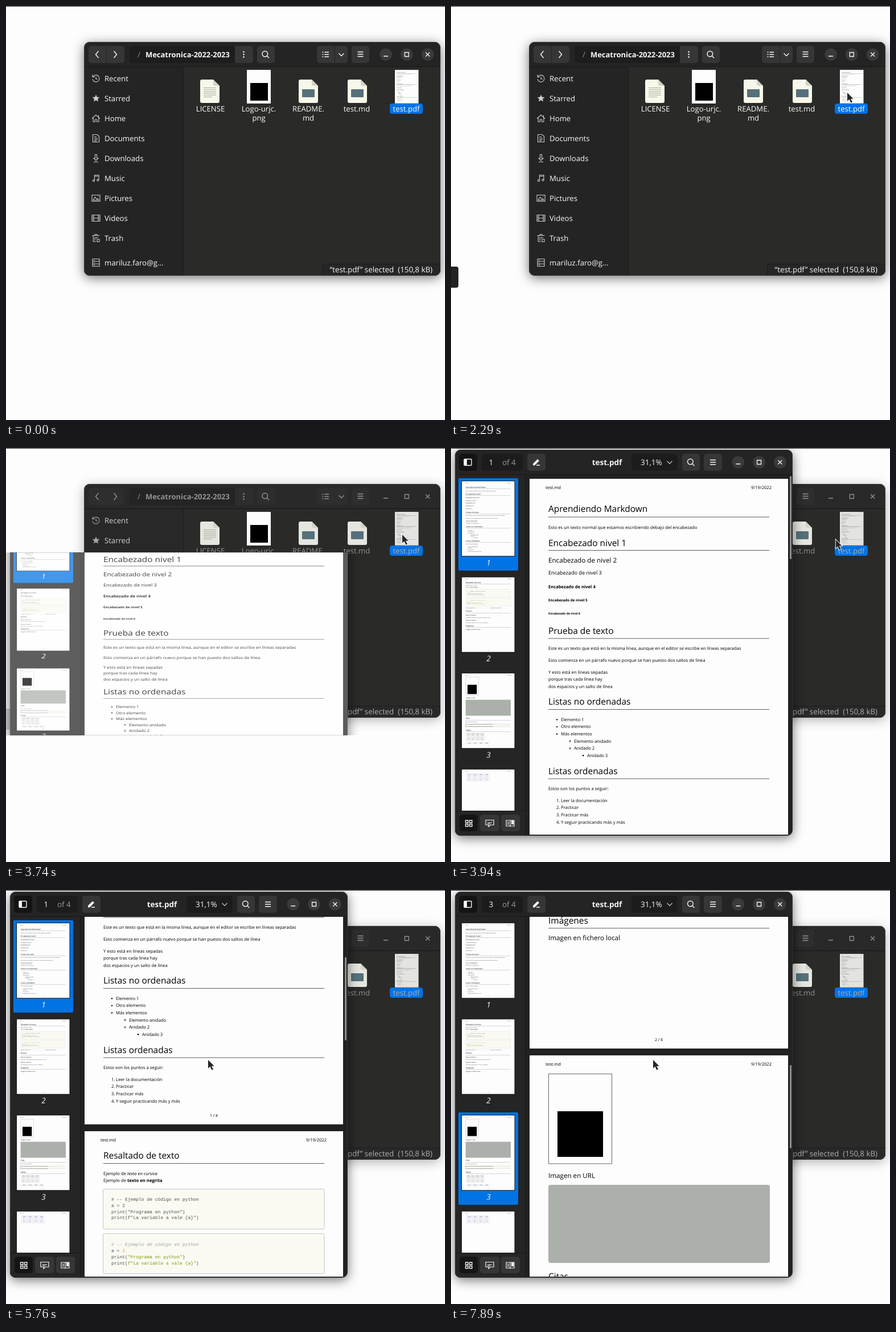
An HTML page with a canvas that plays this animation: 771x726 px, repeating every 8 s.

```html
<!DOCTYPE html>
<html lang="es">
<head>
<meta charset="utf-8">
<title>Vista previa de PDF</title>
<style>
html, body { margin: 0; width: 100%; height: 100%; overflow: hidden; background: #fdfdfd; }
canvas { display: block; }
</style>
</head>
<body>
<canvas id="stage" width="771" height="726"></canvas>
<script>
const ctx = document.getElementById('stage').getContext('2d');
const LOOP = 8000, BLUE = '#0073e5', SANS = '"Open Sans", "Noto Sans", sans-serif';
const MONO = '"Liberation Mono", "DejaVu Sans Mono", monospace';
const NOTCHES = [5360, 5560, 5660, 5760, 5870, 5930, 6440, 6570, 6740, 6910, 7180, 7350, 7450, 7550, 7890];
const NOTCH = 71.6, PITCH = 655, PAGE_W = 454, PAGE_H = 643;

const clamp = v => Math.max(0, Math.min(1, v));
const smooth = v => { v = clamp(v); return v * v * (3 - 2 * v); };
const mix = (a, b, k) => a + (b - a) * k;
const gray = v => `rgb(${v},${v},${v})`;

// y is the middle of the capital letters
function text(s, x, y, size, color = '#000', style = '', align = 'left', family = SANS) {
  ctx.font = `${style} ${size}px ${family}`;
  ctx.fillStyle = color;
  ctx.textAlign = align;
  ctx.fillText(s, x, y + size * 0.36);
  return ctx.measureText(s).width;
}
function box(x, y, w, h, color, r = 0) {
  ctx.fillStyle = color;
  ctx.beginPath();
  ctx.roundRect(x, y, w, h, r);
  ctx.fill();
}
function frame(x, y, w, h, color, r = 0, width = 1) {
  ctx.strokeStyle = color;
  ctx.lineWidth = width;
  ctx.beginPath();
  ctx.roundRect(x, y, w, h, r);
  ctx.stroke();
}
function dot(x, y, r, color) {
  ctx.fillStyle = color;
  ctx.beginPath();
  ctx.arc(x, y, r, 0, 7);
  ctx.fill();
}
function icon(d, x, y, color, fill = false, width = 1.1) {
  ctx.save();
  ctx.translate(x, y);
  const path = new Path2D(d);
  ctx.fillStyle = ctx.strokeStyle = color;
  ctx.lineWidth = width;
  fill ? ctx.fill(path) : ctx.stroke(path);
  ctx.restore();
}
function openWindow(x, y, w, h, color, shade) {
  ctx.save();
  ctx.shadowColor = `rgba(0,0,0,${shade})`;
  ctx.shadowBlur = 20;
  ctx.shadowOffsetY = 4;
  box(x, y, w, h, color, 10);
  ctx.restore();
  ctx.save();
  ctx.beginPath();
  ctx.roundRect(x, y, w, h, 10);
  ctx.clip();
}
function closeWindow(x, y, w, h) {
  ctx.restore();
  frame(x + .5, y + .5, w - 1, h - 1, 'rgba(90,90,90,.35)', 10);
}

const SEARCH = 'M-6 -1a4.8 4.8 0 1 0 9.6 0a4.8 4.8 0 1 0 -9.6 0M2.2 2.6L6 6.2';
const MENU = 'M-5 -4H5M-5 0H5M-5 4H5';
const DOWN = 'M-4.5 -2L0 2.5L4.5 -2';
const CONTROLS = ['M-4 3H4', 'M-3.5 -3.5H3.5V3.5H-3.5z', 'M-3.5 -3.5L3.5 3.5M3.5 -3.5L-3.5 3.5'];
function controls(x, y, disc, ink) {
  CONTROLS.forEach((d, i) => {
    dot(x + i * 36.8, y, 10.8, disc);
    icon(d, x + i * 36.8, y, ink, false, 1.3);
  });
}

/* ---------- document ---------- */

const h1 = (s, y, rule) => {
  text(s, 33, y, 15.45);
  box(33, rule - .5, 388, 1, '#5c5c68');
};
const h2 = (s, y) => text(s, 33, y, 11.65);
const para = (s, y, x = 33) => text(s, x, y, 7.7);
function runs(x, y, parts) {
  for (const [s, color, style, mono] of parts)
    x += text(s, x, y, mono ? 8 : 7.7, color, style, 'left', mono ? MONO : SANS);
}
const code = (y, ...parts) => runs(47, y, parts.map(([s, c, st]) => [s, c, st, true]));

function table(y, cols, rows, step, color) {
  for (let r = 0; r < rows; r++) {
    for (let c = 0; c < cols; c++) {
      frame(39 + c * step, y + r * 17, step, 17, '#c4c4d0');
      text(r ? 'dato ' + (r + c) : 'Campo', 39 + (c + .5) * step, y + r * 17 + 8.5, 7.7, color, r ? '' : 'bold', 'center');
    }
  }
}

const PAGES = [
  () => {
    h1('Aprendiendo Markdown', 52, 67);
    para('Esto es un texto normal que estamos escribiendo debajo del encabezado', 85);
    h1('Encabezado nivel 1', 112, 125.5);
    h2('Encabezado de nivel 2', 143);
    text('Encabezado de nivel 3', 33, 165, 9.1);
    [[189, 7.6], [212.5, 6.3], [236.5, 5.15]].forEach(([y, size], i) =>
      text('Encabezado de nivel ' + (i + 4), 33, y, size, '#000', 'bold'));
    h1('Prueba de texto', 266, 280);
    para('Este es un texto que está en la misma línea, aunque en el editor se escribe en líneas separadas', 297.5);
    para('Esto comienza en un párrafo nuevo porque se han puesto dos saltos de línea', 318);
    para('Y esto está en líneas sepadas', 339);
    para('porque tras cada línea hay', 351.3);
    para('dos espacios y un salto de línea', 364);
    h1('Listas no ordenadas', 390, 404.5);
    ['Elemento 1', 'Otro elemento', 'Más elementos', 'Elemento anidado', 'Anidado 2', 'Anidado 3'].forEach((s, i) => {
      const y = 422 + i * 12.6, level = i < 3 ? 0 : i < 5 ? 1 : 2;
      const x = 55 + level * 23;
      para(s, y, x);
      if (level === 0) dot(x - 7, y + .3, 1.2, '#111');
      if (level === 1) frame(x - 8.2, y - 1, 2.5, 2.5, '#111', 1.2, .8);
      if (level === 2) box(x - 8, y - .9, 2.3, 2.3, '#111');
    });
    h1('Listas ordenadas', 512, 526);
    para('Estos son los puntos a seguir:', 543);
    ['Leer la documentación', 'Practicar', 'Practicar más', 'Y seguir practicando más y más'].forEach((s, i) => {
      para(i + 1 + '.', 564 + i * 12.65, 47);
      para(s, 564 + i * 12.65, 55);
    });
  },
  () => {
    h1('Resaltado de texto', 42.5, 56.5);
    runs(33, 74, [['Ejemplo de '], ['texto en cursiva', '#000', 'italic']]);
    runs(33, 86, [['Ejemplo de '], ['texto en negrita', '#000', 'bold']]);
    for (const y of [101.5, 179.5]) {
      box(32.5, y, 388.5, 70, '#fafaf3', 2);
      frame(32.5, y, 388.5, 70, '#c3c5c9', 2);
    }
    const note = '# -- Ejemplo de código en python', ink = '#505050', str = '#7f9900';
    const hello = '"Programa en python"', value = '"La variable a vale {a}"';
    code(119, [note, ink]);
    code(130, ['a = 2', ink]);
    code(140.7, [`print(${hello})`, ink]);
    code(151.5, [`print(f${value})`, ink]);
    code(198.5, [note, '#a0a0a0', 'italic']);
    code(209.2, ['a = ', ink], ['2', '#e0942c']);
    code(220, ['print(', ink], [hello, str], [')', ink]);
    code(231, ['print(', ink], ['f' + value, str], [')', ink]);
    runs(33, 264.5, [['En python la expresión '], ['print(f" a + b = {2 + 1} ")', '#c2b98c', '', true],
      [' produce como resultado '], ['a + b = 2', '#c2b98c', '', true]]);
    h1('Enlaces', 292, 306);
    h2('Enlaces externos', 324);
    runs(33, 345.5, [['En docuteria encontramos más información sobre '], ['markdown', '#1c1cc0']]);
    h2('Enlaces internos', 369);
    runs(33, 390.5, [['Aquí hay información sobre '], ['los enlaces', '#1c1cc0'], [' en markdwon']]);
    h1('Imágenes', 418, 432);
    h2('Imagen en fichero local', 449);
  },
  () => {
    frame(33.5, 32.5, 111, 157.5, '#666');
    box(49, 98, 80, 80, '#000');
    h2('Imagen en URL', 211);
    box(33, 227, 389, 137, '#abb1aa', 4);
    h1('Citas', 387, 402);
    para('Esto es una cita de prueba:', 418);
    for (const y of [432, 450]) {
      box(33, y, 388, 14, '#f1f1ea');
      box(33, y, 4, 14, '#8a8a9a');
      para('Una cita breve que se escribe en una sola línea del documento', y + 7, 45);
    }
    h1('Tablas', 487, 502);
    table(512, 4, 4, 39, '#333');
    table(592, 4, 1, 50, '#333');
  },
  () => table(34, 4, 4, 50, '#3c2c90')
];

function page(i) {
  box(0, 0, PAGE_W, PAGE_H, '#fdfdfd');
  text('test.md', 28, 15, 7.6);
  text('9/19/2022', 425, 15, 7.6, '#000', '', 'right');
  PAGES[i]();
  text(i + 1 + ' / 4', 227, 627, 7, '#000', '', 'center');
}
function pageAt(i, x, y, scale = 1) {
  ctx.save();
  ctx.translate(x, y);
  ctx.scale(scale, scale);
  page(i);
  ctx.restore();
}

/* ---------- file browser ---------- */

const PLACES = [
  ['Recent', 'M-5.2 -3A6 6 0 1 1 -6 1M-6 -6.5V-2.5H-2M0 -3V1H3'],
  ['Starred', 'M0 -6.5l1.9 4.2 4.5.4-3.4 3 1 4.5L0 3.2-4 5.6l1-4.5-3.4-3 4.5-.4z', true],
  ['Home', 'M-7 .5L0 -6L7 .5M-4.8 -1V6H-1.5V2H1.5V6H4.8V-1M4.5 -5.5V-2.5'],
  ['Documents', 'M-5.5 -6.5H2L5.5 -3.5V6.5H-5.5zM-3 -2.5H1M-3 0H3M-3 2.5H3M-3 4.5H1'],
  ['Downloads', 'M-1.5 -6.5H1.5V0H4L0 4L-4 0H-1.5zM-4 6.5H4'],
  ['Music', 'M-2.5 4.5V-5.5H5V3.5M-2.5 -3.5H5M-2.5 4.5a1.6 1.6 0 1 1 0 -.6M5 3.5a1.6 1.6 0 1 1 0 -.6'],
  ['Pictures', 'M-7 -5.5H7V5.5H-7zM-5 3.5L-1.5 -2L1.5 2L3 .5L5 3.5zM3 -3h1.5'],
  ['Videos', 'M-7 -5.5H7V5.5H-7zM-4 -5.5V5.5M4 -5.5V5.5M-4 0H4M-7 -2H-4M-7 2H-4M4 -2H7M4 2H7'],
  ['Trash', 'M-6.5 -4.5H6.5M-2 -4.5V-6.5H2V-4.5M-4.8 -4.5V6H0M-2 -2V4M.5 -2V1M3 -2V0M2 6.5V2H6V6.5z'],
  ['mariluz.faro@g…', 'M-6 -6.5H6V6.5H-6zM-6 -2.2H6M-6 2.2H6M-4 -4.3H-2M-4 0H-2M-4 4.4H-2']
];

function sheet(x, y, paper, kind) {
  ctx.fillStyle = paper;
  ctx.fill(new Path2D(`M${x + 3} ${y}h20l11 11v27q0 3 -3 3h-28q-3 0 -3 -3v-35q0 -3 3 -3z`));
  ctx.fillStyle = '#d3d3c6';
  ctx.fill(new Path2D(`M${x + 23} ${y}l11 11h-8q-3 0 -3 -3z`));
  if (kind === 'mark') box(x + 6, y + 17, 22, 14, '#56707a', 1);
  else for (let i = 0; i < 6; i++) box(x + 6, y + 14 + i * 3.2, i === 5 ? 15 : 22, 1, '#a5a59c');
}

// b runs from 0 (focused) to 1 (in the background)
function browser(b) {
  const ink = gray(mix(250, 146, b)), head = gray(mix(36, 41, b)), button = gray(mix(54, 46, b));
  const label = (s, x, y) => text(s, x, y, 13.1, ink, '', 'center');
  openWindow(137, 63, 626, 410, '#2a2a28', mix(.55, .3, b));
  box(137, 63, 626, 43, head);
  box(137, 106, 626, 1, '#171717');
  box(137, 107, 174, 366, gray(mix(36, 40, b)));
  box(311, 107, 1, 366, '#1b1b1b');

  box(145, 70, 63, 30, button, 5);
  box(176, 70, 1, 30, head);
  icon('M2.5 -6L-2.5 0L2.5 6', 160, 85, ink, false, 1.4);
  icon('M-2.5 -6L2.5 0L-2.5 6', 192, 85, ink, false, 1.4);
  box(217, 70, 217, 30, gray(mix(29, 36, b)), 5);
  box(402, 70, 32, 30, button, [0, 5, 5, 0]);
  text('/', 231, 85, 13.5, '#8d8d8d');
  text('Mecatronica-2022-2023', 245, 85, 12.95, ink, 'bold');
  for (const y of [80.5, 85, 89.5]) dot(417.5, y, 1.3, ink);
  box(441, 70, 31, 30, button, 5);
  icon(SEARCH, 456, 85, ink, false, 1.4);
  box(546, 70, 54, 30, button, 5);
  box(577, 70, 1, 30, head);
  icon('M-1.5 -4H6M-1.5 0H6M-1.5 4H6M-5.5 -4H-3.5M-5.5 0H-3.5M-5.5 4H-3.5', 561, 85, ink, false, 1.7);
  icon(DOWN, 589, 85, ink, false, 1.3);
  box(607, 70, 31, 30, button, 5);
  icon(MENU, 622.5, 84.5, ink, false, 1.4);
  controls(667, 85, gray(mix(58, 41, b)), ink);

  PLACES.forEach(([name, d, fill], i) => {
    const y = i < 9 ? 127 + i * 35 : 450;
    icon(d, 158, y, gray(mix(205, 165, b)), fill);
    text(name, 173, y, 13.15, gray(mix(250, 210, b)));
  });

  const paper = b > .5 ? '#e6e6e0' : '#f8f8ea';
  sheet(341, 129, paper);
  sheet(514, 129, paper, 'mark');
  sheet(600, 129, paper, 'mark');
  box(423, 112, 42, 59, '#fdfdfd');
  box(429, 135, 31, 31, '#000');
  pageAt(0, 683, 112, 41.5 / PAGE_W);
  box(683, 112, 42, 59, `rgba(60,60,40,${.13 * b})`);
  box(674, 171, 58, 18, BLUE, 4);
  label('LICENSE', 359, 180);
  label('Logo-urjc.', 444, 180);
  label('png', 444, 196);
  label('README.', 531, 180);
  label('md', 531, 196);
  label('test.md', 616, 180);
  text('test.pdf', 703, 180, 13.1, gray(mix(255, 175, b)), '', 'center');

  box(555, 452, 208, 21, '#1c1c1c', [4, 0, 0, 0]);
  box(556, 453, 207, 20, gray(mix(38, 41, b)), [3, 0, 0, 0]);
  text('“test.pdf” selected  (150,8 kB)', 749, 462, 13.35, gray(mix(250, 175, b)), '', 'right');
  closeWindow(137, 63, 626, 410);
}

/* ---------- document viewer ---------- */

const VIEWER = [7, 3, 593, 677];

function viewer(scroll, bar) {
  const current = Math.floor((scroll + PITCH - 340) / PITCH);
  const button = '#363636', ink = '#f7f7f7';
  openWindow(...VIEWER, '#212121', .55);

  ctx.save();
  ctx.beginPath();
  ctx.rect(138, 47, 454, 631);
  ctx.clip();
  for (let i = 0; i < 4; i++) {
    const y = Math.round(54 + i * PITCH - scroll);
    if (y < 678 && y + PAGE_H > 47) pageAt(i, 138, y);
  }
  ctx.restore();
  if (bar) box(595, 49 + scroll * 632 / 2630, 3, 146, '#8c8c8c', 1.5);

  box(7, 47, 123, 633, '#252525');
  box(130, 47, 1, 633, '#181818');
  ctx.save();
  ctx.beginPath();
  ctx.rect(7, 47, 123, 589);
  ctx.clip();
  for (let i = 0; i < 4; i++) {
    const y = i * 168.5;
    if (i === current) box(13, 53 + y, 105, 162, BLUE, 2);
    box(18, 57.3 + y, 94.5, 133, '#111');
    pageAt(i, 19, 58.3 + y, 92.5 / PAGE_W);
    text(i + 1, 66, 201 + y, 13.5, ink, 'italic', 'center');
  }
  ctx.restore();
  box(7, 636, 123, 44, '#262626');
  box(7, 636, 123, 1, '#181818');
  box(15, 643, 32, 29, '#151515', 5);
  box(51, 643, 34, 29, button, 5);
  box(88, 643, 33, 29, button, 5);
  icon('M-5.5 -5H-1V-1H-5.5zM1.5 -5H6V-1H1.5zM-5.5 1.5H-1V5.5H-5.5zM1.5 1.5H6V5.5H1.5z', 31, 658, ink, false, 1.3);
  icon('M-7 -5.5H7V3H1L-2 6V3H-7zM-4 -1H4M-4 1H1', 68, 658, ink, false, 1.2);
  icon('M-7 -5H7V5H-7zM0 -5V6M-5 -2H-2M-5 0H-2M-5 2H-2', 104, 658, ink, false, 1.2);
  box(106, 653, 4, 7, ink);

  box(7, 3, 593, 44, '#242424');
  box(7, 46, 593, 1, '#171717');
  box(14, 10, 32, 30, '#141414', 5);
  frame(23, 19.5, 13, 11, ink, 1, 1.4);
  box(23, 19.5, 5, 11, ink);
  box(54, 10, 72, 30, '#1c1c1c', 5);
  text(current + 1, 66.5, 25, 13.4, ink);
  text('of 4', 90, 25, 13.4, '#9a9a9a');
  box(134, 10, 32, 30, button, 5);
  icon('M-6 3L2 -5L5 -2L-3 6H-6zM0 5H6V6.5H0z', 150, 24.5, ink, true);
  text('test.pdf', 274, 25, 13.5, ink, 'bold', 'center');
  box(317, 10, 81, 30, '#1c1c1c', 5);
  text('31,1%', 333, 25, 13.5, ink);
  icon(DOWN, 384, 25, '#bbb', false, 1.3);
  box(406, 10, 31, 30, button, 5);
  icon(SEARCH, 421.5, 25, ink, false, 1.4);
  box(444, 10, 32, 30, button, 5);
  icon(MENU, 460, 25, ink, false, 1.4);
  controls(504.3, 25, '#3a3a3a', ink);
  closeWindow(...VIEWER);
}

// Opens like an old TV: a white line that grows into the window
function viewerOpening(p) {
  const k = 1 - p / 2, cx = 303.5, cy = 343.5;
  const halfH = 363 * (1 - smooth(p / .7)), halfW = 323 * (1 - smooth((p - .6) / .4));
  ctx.save();
  ctx.globalAlpha = 1 - smooth((p - .9) / .1);
  ctx.translate(0, cy * (1 - k));
  ctx.scale(1, k);
  ctx.beginPath();
  ctx.rect(cx - halfW, cy - halfH, halfW * 2, halfH * 2);
  ctx.clip();
  viewer(0, false);
  box(...VIEWER, `rgba(255,255,255,${smooth(p)})`, 10);
  ctx.restore();
}

/* ---------- pointer and timeline ---------- */

function pointer(t) {
  if (t < 940) return;
  const a = smooth((t - 940) / 1350), u = clamp((t - 3898) / 1432);
  const x = t < 3898 ? mix(-8, 696, a) : mix(696, 355, 1 - (1 - u) ** 2);
  const y = t < 3898 ? mix(570, 152, a) : mix(152, 298, u ** .8);
  const arrow = 'M0 0V14.8L3.5 11.6L6.4 17.8L8.9 16.6L6 10.7H10.6z';
  icon(arrow, x, y, '#f4f4f4', false, 2);
  icon(arrow, x, y, '#262626', true);
}

function draw(t) {
  ctx.textRendering = 'geometricPrecision';
  box(0, 0, 771, 726, '#fdfdfd');
  box(0, 0, 771, 1, '#2b2b30');
  browser(clamp((t - 3490) / 200));

  const tip = clamp((t - 960) / 100) * clamp((3775 - t) / 175);
  if (tip > 0) {
    ctx.globalAlpha = tip;
    box(-20, 457, 33, 37, '#232323', 4);
    ctx.globalAlpha = 1;
  }

  const p = clamp(1 - (t - 3472) / 405);
  if (p === 0) viewer(NOTCH * NOTCHES.filter(n => t >= n).length, true);
  else if (p < 1) viewerOpening(p);
  pointer(t);
}

const start = performance.now();
function tick() {
  draw((performance.now() - start) % LOOP);
  requestAnimationFrame(tick);
}
tick();
</script>
</body>
</html>
```
